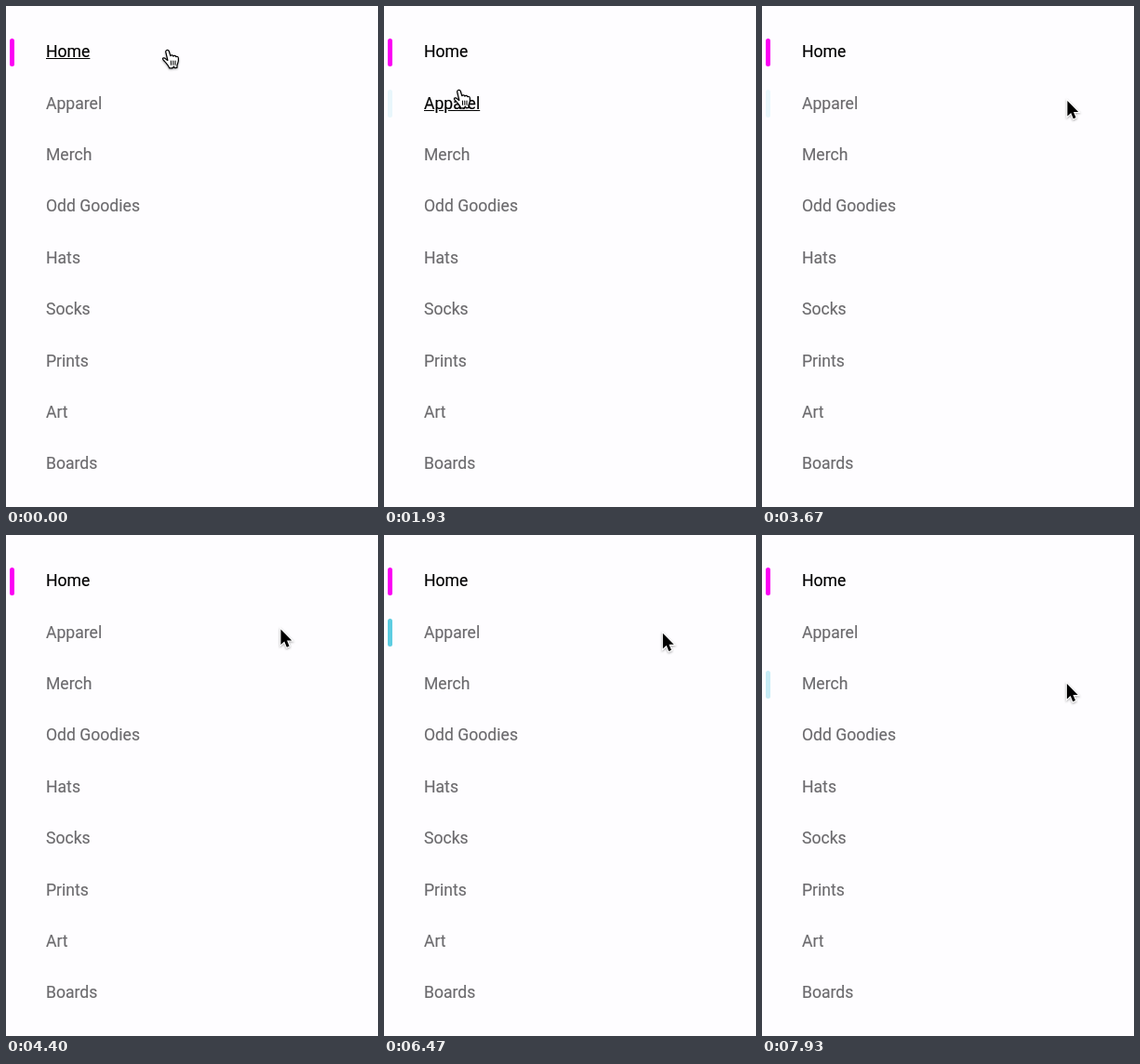
Write an HTML page that moves like this. It is 400 px wide and 539 px high and loops after 8 s.

```html
<!DOCTYPE html>
<html lang="en">
<head>
<meta charset="utf-8">
<title>Menu hover</title>
<style>
html, body { margin: 0; width: 100%; height: 100%; overflow: hidden; background: #fefdff; }
nav { position: absolute; inset: 0; overflow: hidden; font: 17.6px/30px Roboto, sans-serif; }
span, i { position: absolute; }
span { left: 43px; color: #6b6a6d; white-space: nowrap; -webkit-text-stroke: .15px; }
span.on { color: #000; }
span.hover { color: #000; text-decoration: underline; }
i { left: 3.6px; width: 5.2px; height: 30px; border-radius: 2.5px; background: #06b3d1; }
svg { position: absolute; left: 0; top: 0; overflow: visible; filter: drop-shadow(0 1px 1px #0005); }
</style>
</head>
<body>
<nav></nav>
<svg width="1" height="1">
  <g id="hand" transform="translate(-.8 -.6) scale(.95)" fill="#fff" stroke="#000" stroke-width="1.3" stroke-linejoin="round" stroke-linecap="round">
    <path d="M-1.6 1.8C-1.2-.4 1.6-.6 2.2 1.4L3.8 6.6C4.6 5.2 6.6 5.4 7 7C8 5.9 9.6 6.2 10 7.7C11.2 6.9 12.6 7.6 12.8 9C13.4 12.5 12.2 14.5 11.4 17L11.2 20L8.8 20.2L7.6 18.8L6.2 20.4H2.6C1.6 17.4-.8 15.4-2.6 13C-4 11.6-5.2 10.8-4.9 9.6C-4.4 8.2-2.4 8.8-1 10.6L.7 11.6Z"/>
    <path d="M4.4 12.2l.2 4.4M6.9 12.2l.1 4.4M9.3 12.2v4.4" stroke-width="1.1"/>
  </g>
  <path id="arrow" d="M0 0V16.5L3.8 13L6.4 19.2L9.1 18L6.6 12H11.8Z" stroke="#fff" stroke-width="2.2" paint-order="stroke"/>
</svg>
<script>
const LOOP = 8000, FPS = 15, FADE = 300, SAMPLES = 30;
const PITCH = 55.4, TOP = 35, MENU_WIDTH = 280;
const labels = ['Home', 'Apparel', 'Merch', 'Odd Goodies', 'Hats', 'Socks', 'Prints', 'Art', 'Boards'];

// Where the pointer turns or rests: time, x, y
const stops = [
  [0, 174, 48], [467, 174, 48], [667, 182, 47], [1067, 82, 49], [1400, 82, 49],
  [1867, 81, 70], [1933, 81, 91], [2400, 82, 92], [3300, 264, 102], [3900, 361, 102],
  [4900, 230, 101], [5250, 292, 104], [5800, 225, 104], [6000, 225, 104],
  [6800, 345, 107], [7133, 238, 161], [7567, 238, 161], [LOOP, 334, 160]
];

const nav = document.querySelector('nav');
const svg = document.querySelector('svg');
const hand = document.getElementById('hand');
const arrow = document.getElementById('arrow');

function add(tag, top) {
  const el = nav.appendChild(document.createElement(tag));
  el.style.top = top + 'px';
  return el;
}

const rows = labels.map((label, i) => {
  const text = add('span', TOP - .85 + PITCH * i);
  text.textContent = label;
  return { text, bar: add('i', TOP + PITCH * i) };
});
rows[0].text.className = 'on';
rows[0].bar.style.background = '#fb00f4';

function pointer(t) {
  const k = stops.findIndex(stop => stop[0] > t);
  const [t0, x0, y0] = stops[k - 1], [t1, x1, y1] = stops[k];
  const u = (t - t0) / (t1 - t0), e = u * u * (3 - 2 * u);
  return [x0 + (x1 - x0) * e, y0 + (y1 - y0) * e];
}

// Index of the row under the pointer, or -1
function rowAt(t) {
  const [x, y] = pointer(Math.max(0, t));
  return x < MENU_WIDTH ? Math.floor((y - TOP - 15) / PITCH + .5) : -1;
}

// Bars follow the recent hover state, weighted to ease in and out
function barOpacities(t) {
  const sums = rows.map(() => 0);
  let total = 0;
  for (let n = 0; n < SAMPLES; n++) {
    const u = (n + .5) / SAMPLES, weight = u * (1 - u) ** 2;
    const row = rowAt(t - u * FADE);
    if (row >= 0) sums[row] += weight;
    total += weight;
  }
  return sums.map(sum => sum / total);
}

function draw(now) {
  const t = Math.floor((now % LOOP + 4) * FPS / 1000) * 1000 / FPS % LOOP;
  const [x, y] = pointer(t), hovered = rowAt(t), opacities = barOpacities(t);
  rows.forEach(({ text, bar }, i) => {
    text.classList.toggle('hover', i === hovered);
    bar.style.opacity = i ? opacities[i] : 1;
  });
  hand.style.display = hovered < 0 ? 'none' : '';
  arrow.style.display = hovered < 0 ? '' : 'none';
  svg.style.transform = `translate(${x}px, ${y}px)`;
}

const start = performance.now();
function tick() {
  draw(performance.now() - start);
  requestAnimationFrame(tick);
}
tick();
</script>
</body>
</html>
```
